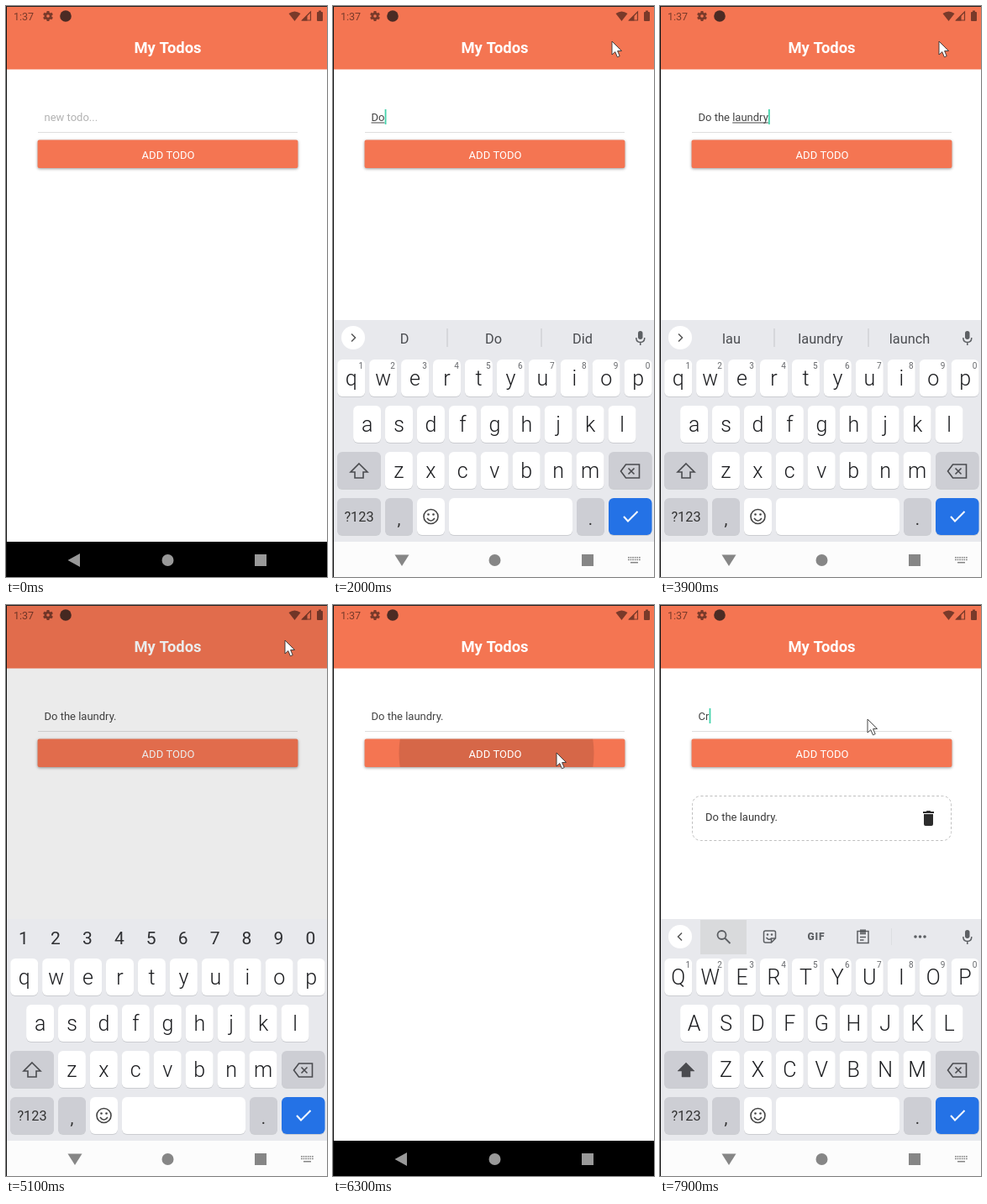
An HTML page with a canvas for the animation above (8000 ms loop, 382 by 680 pixels).

```html
<!DOCTYPE html>
<html lang="en">
<head>
<meta charset="utf-8">
<title>My Todos</title>
<style>
html, body { margin: 0; width: 100%; height: 100%; overflow: hidden; background: #fff; }
canvas { display: block; width: 382px; height: 680px; }
</style>
</head>
<body>
<canvas id="stage"></canvas>
<script>
const W = 382, H = 680, LOOP = 8000, STEP = 100, NAV_Y = 638;
const FONT = 'Roboto, Arial, sans-serif';
const CORAL = '#f47552', STATUS = '#793a2a', ICON = '#5c5f63';
const canvas = document.getElementById('stage');
const dpr = window.devicePixelRatio || 1;
canvas.width = W * dpr;
canvas.height = H * dpr;
const c = canvas.getContext('2d');

// [time, value] lists: the latest entry at or before t applies
const TYPED = [
  [0, ''], [1700, 'D'], [2000, 'Do'], [2200, 'Do '], [2300, 'Do t'], [2400, 'Do th'],
  [2500, 'Do the'], [2600, 'Do the '], [2800, 'Do the l'], [2900, 'Do the la'],
  [3100, 'Do the lau'], [3700, 'Do the laun'], [3800, 'Do the laundr'],
  [3900, 'Do the laundry'], [4200, 'Do the laundry.'], [6700, ''], [7800, 'C'], [7900, 'Cr']
];
const HINTS = [
  [0, null], [1700, 'D|Do|Did'], [2100, 'Do|Don\u2019t|Does'], [2300, 't|the|to'],
  [2500, 'the|them|then'], [2800, 'l|look|last'], [3100, 'lau|laundry|launch'],
  [4000, 'laundry|laundry\u2019s|launder'], [7000, null]
];
const POINTER = [
  [200, 4, 163], [600, 180, 132], [800, 210, 130], [1000, 330, 50], [1100, 332, 42],
  [5800, 332, 42], [6200, 266, 176], [7000, 266, 176], [7400, 247, 136]
];

const clamp = v => Math.max(0, Math.min(1, v));
const latest = (list, t) => list.filter(e => e[0] <= t).pop()[1];

function pointerAt(t) {
  if (t < POINTER[0][0]) return null;
  const i = POINTER.findIndex(p => p[0] > t);
  if (i < 0) return POINTER[POINTER.length - 1].slice(1);
  const a = POINTER[i - 1], b = POINTER[i], k = (t - a[0]) / (b[0] - a[0]);
  return [a[1] + (b[1] - a[1]) * k, a[2] + (b[2] - a[2]) * k];
}

function keyboardAt(t) {
  const rise = p => ({ off: 265 * Math.pow(1 - clamp(p), 1.6), alpha: clamp(p * 1.6) });
  if (t < 1100 || (t >= 5500 && t < 7600)) return { off: 265, alpha: 0 };
  if (t >= 7600) return rise((t - 7520) / 340);
  if (t < 5200) return rise((t - 1050) / 450);
  const p = (t - 5100) / 300;
  return { off: 130 * Math.pow(p, 1.5), alpha: 1 - 0.65 * p };
}

function rect(x, y, w, h, color) {
  c.fillStyle = color;
  c.fillRect(x, y, w, h);
}
function box(x, y, w, h, r, color) {
  c.beginPath();
  c.roundRect(x, y, w, h, r);
  c.fillStyle = color;
  c.fill();
}
function disc(x, y, r, color) {
  c.beginPath();
  c.arc(x, y, r, 0, 7);
  c.fillStyle = color;
  c.fill();
}
function path(d, x, y, fill, stroke, width = 1.5) {
  const p = new Path2D(d);
  c.save();
  c.translate(x, y);
  if (fill) { c.fillStyle = fill; c.fill(p); }
  if (stroke) { c.strokeStyle = stroke; c.lineWidth = width; c.stroke(p); }
  c.restore();
}
function text(s, x, y, size, color, align = 'left', weight = 400) {
  c.font = `${weight} ${size}px ${FONT}`;
  c.textAlign = align;
  c.fillStyle = color;
  c.fillText(s, x, y);
}

function drawHeader() {
  rect(0, 0, W, 75.5, CORAL);
  text('1:37', 9, 17, 12.5, STATUS);
  c.save();
  c.translate(50, 12);
  for (let i = 0; i < 6; i++) {
    rect(-1.5, -6, 3, 4, STATUS);
    c.rotate(Math.PI / 3);
  }
  c.restore();
  disc(50, 12, 4.5, STATUS);
  disc(50, 12, 1.8, CORAL);
  disc(71, 12, 6.8, '#4b2b24');
  path('M-7 -3 Q0 -8 7 -3 L0 6 Z', 343.5, 12, STATUS);
  path('M-5 5 L5 5 L5 -5 Z', 357.5, 12, null, STATUS, 1.2);
  path('M-5.5 5.5 L1 5.5 L1 -1 Z', 357.5, 12, STATUS);
  box(370, 7, 7, 11, 1, STATUS);
  rect(372, 5.5, 3, 2, STATUS);
  text('My Todos', 192.5, 56, 18.4, '#fff', 'center', 700);
}

function drawInput(t) {
  const s = latest(TYPED, t);
  const x = 45.5;
  text(s || 'new todo...', x, 137, 13, s ? '#444' : '#b2b2b2');
  rect(38, 150, 309, 1, '#dedede');
  const end = x + (s ? c.measureText(s).width : 0);
  const word = s.split(' ').pop();
  if (word && t < 4200) rect(end - c.measureText(word).width, 138.5, c.measureText(word).width, 1, '#444');
  const focused = (t >= 1100 && t < 4600) || t >= 7600;
  const blink = t >= 3500 && t < 3700;
  if (focused && !blink) rect(end + 0.2, 123, 1.8, 18, '#45d3ac');
}

function buttonShape() {
  c.beginPath();
  c.roundRect(37.6, 159.6, 309.8, 33.4, 2);
}
function drawButton(t) {
  c.save();
  c.shadowColor = 'rgba(0,0,0,.4)';
  c.shadowBlur = 3.5 * dpr;
  c.shadowOffsetY = dpr;
  buttonShape();
  c.fillStyle = CORAL;
  c.fill();
  c.restore();
  if (t >= 6200 && t < 6600) {
    c.save();
    buttonShape();
    c.clip();
    const k = (t - 6200) / 100;
    disc(194.5, 176.5, 50 + 66 * k, `rgba(0,0,0,${k < 3 ? 0.12 : 0.06})`);
    c.restore();
  }
  text('ADD TODO', 193, 182, 13, '#fff', 'center');
}

function drawItem() {
  c.beginPath();
  c.roundRect(38.5, 227.5, 308, 53, 10);
  c.setLineDash([3, 2.5]);
  c.lineWidth = 1;
  c.strokeStyle = '#bfbfbf';
  c.stroke();
  c.setLineDash([]);
  text('Do the laundry.', 54, 257, 13, '#3a3a3a');
  path('M-6.5 -8 H-3 L-2 -9 H2 L3 -8 H6.5 V-6 H-6.5 Z M-5.5 -5 H5.5 V7 Q5.5 9 3.5 9 H-3.5 Q-5.5 9 -5.5 7 Z', 319.5, 254, '#2c2c2c');
}

function drawKey(x, y, w, color) {
  box(x, y + 1, w, 44, 6, '#cbcdd1');
  box(x, y, w, 44, 6, color);
}

function drawMic() {
  box(363, 387, 5.5, 10, 3, ICON);
  path('M-5 0 Q-5 5.5 0 5.5 Q5 5.5 5 0 M0 5.5 V9', 365.8, 395, null, ICON);
}

function drawStrip(hints, t) {
  if (t >= 7800) rect(48, 375, 55, 41, '#d9dadc');
  disc(24, 395, 14, '#fff');
  path(hints ? 'M-2 -4.5 L2.5 0 L-2 4.5' : 'M2 -4.5 L-2.5 0 L2 4.5', 24, 395, null, '#555', 1.5);
  drawMic();
  if (hints) {
    hints.split('|').forEach((s, i) => text(s, 85 + 106 * i, 401.5, 16.3, '#4a4c50', 'center'));
    rect(135.5, 384, 1, 22, '#c3c5c9');
    rect(247.5, 384, 1, 22, '#c3c5c9');
    return;
  }
  path('M3 -2 A5 5 0 1 1 -7 -2 A5 5 0 1 1 3 -2 M2 2 L8 8', 75.5, 395, null, ICON, 1.8);
  path('M-5 -7 H5 Q7 -7 7 -5 V2 L2 7 H-5 Q-7 7 -7 5 V-5 Q-7 -7 -5 -7 M7 2 H2 V7 M-4 1 Q-1 5 2 2', 130.5, 395, null, ICON);
  disc(128, 392.5, 1.2, ICON);
  disc(133, 392.5, 1.2, ICON);
  c.letterSpacing = '0.9px';
  text('GIF', 186, 399, 12, ICON, 'center', 900);
  c.letterSpacing = '0px';
  path('M-6.5 -6 H6.5 V8 H-6.5 Z M-3.5 -3 H3.5 M-3.5 1 H3.5 M-3.5 4.5 H1', 241.5, 394.5, null, ICON);
  rect(238, 386.5, 7, 4, ICON);
  rect(275, 385, 1, 20, '#dcdee1');
  for (let i = -1; i <= 1; i++) disc(309.5 + 5.5 * i, 395, 1.8, ICON);
}

function drawLetters(row, x, y, upper, digits) {
  [...row].forEach((ch, i) => {
    const cx = x + 37.93 * i;
    drawKey(cx - 16.5, y, 33, '#fff');
    text(upper ? ch.toUpperCase() : ch, cx, y + 31, 25, '#1c1d20', 'center', 300);
    if (digits) text((i + 1) % 10, cx + 11.5, y + 11, 10, '#66686c', 'center');
  });
}

function drawKeyboard(t, kb) {
  const numbers = t >= 4900 && t < 5500;
  const upper = t < 1700 || t >= 7600;
  const grey = '#cdced4';
  c.save();
  c.globalAlpha = kb.alpha;
  c.translate(0, kb.off);
  rect(0, 374, W, H - 374, '#e8e9ed');
  rect(0, NAV_Y, W, H - NAV_Y, '#fcfcfc');
  if (numbers) {
    for (let i = 0; i < 10; i++) text((i + 1) % 10, 21 + 37.93 * i, 404, 21, '#303134', 'center');
  } else {
    drawStrip(latest(HINTS, t), t);
  }
  drawLetters('qwertyuiop', 21.7, 421, upper, !numbers);
  drawLetters('asdfghjkl', 40.6, 476, upper);
  drawLetters('zxcvbnm', 78.4, 531, upper);

  drawKey(5, 531, 52, grey);
  path('M0 -9 L10 1 H5 V8 H-5 V1 H-10 Z', 31, 554, upper ? '#4a4b4f' : null, '#4a4b4f', upper ? 0.5 : 1.6);
  drawKey(328, 531, 51.5, grey);
  path('M-11 0 L-5 -8 H11 V8 H-5 Z M-2 -3.5 L5 3.5 M5 -3.5 L-2 3.5', 353.5, 554, null, '#4a4b4f', 1.6);

  drawKey(5, 586, 52, grey);
  text('?123', 31, 614, 16.3, '#333', 'center');
  drawKey(62, 586, 33, grey);
  text(',', 78.5, 618, 20, '#333', 'center');
  drawKey(100, 586, 33, '#fff');
  c.beginPath();
  c.arc(116.5, 608, 8.5, 0, 7);
  c.lineWidth = 1.6;
  c.strokeStyle = '#444';
  c.stroke();
  disc(113.5, 605.5, 1.3, '#444');
  disc(119.5, 605.5, 1.3, '#444');
  path('M-4.5 2 Q0 8 4.5 2', 116.5, 608, null, '#444', 1.5);
  drawKey(138, 586, 147, '#fff');
  drawKey(290, 586, 33, grey);
  text('.', 306.5, 618, 20, '#333', 'center');
  drawKey(328, 586, 51.5, '#2472e6');
  path('M-8 0 L-3 5.5 L8.5 -6', 354, 608, null, '#fff', 2);
  c.restore();
}

function drawNav(kb) {
  const open = kb.off < 1;
  const shade = open ? '#868686' : kb.alpha > 0.6 ? '#e0e0e0' : '#999';
  if (!open) rect(0, NAV_Y, W, H - NAV_Y, `rgba(0,0,0,${clamp((kb.off / 160) ** 2)})`);
  if (open) path('M-8.5 -6.5 H8.5 L0 7 Z', 82, 660, shade);
  else path('M7.5 -8 V8 L-7 0 Z', 80.5, 660, shade);
  disc(192.5, 660, 7, shade);
  rect(296, 653, 14, 14, shade);
  if (kb.alpha > 0.7) {
    for (let i = 0; i < 6; i++) {
      rect(351 + 2.6 * i, 656, 1.7, 1.5, shade);
      rect(351 + 2.6 * i, 658.7, 1.7, 1.5, shade);
    }
    rect(354, 662, 9, 1.5, shade);
  }
}

function drawPointer(p) {
  if (p) path('M0 0 V16 L3.8 12.6 L6.4 18.8 L9.2 17.6 L6.6 11.6 L11.5 11.4 Z', p[0], p[1], '#fff', '#333', 0.9);
}

function draw(t) {
  c.setTransform(dpr, 0, 0, dpr, 0, 0);
  rect(0, 0, W, H, '#fff');
  drawHeader();
  drawInput(t);
  drawButton(t);
  if (t >= 6700) drawItem();
  if (t >= 4600 && t < 5800) rect(0, 0, W, H, `rgba(0,0,0,${0.08 * clamp((t - 4500) / 300)})`);
  rect(0, NAV_Y, W, H - NAV_Y, '#000');
  const kb = keyboardAt(t);
  if (kb.alpha > 0) drawKeyboard(t, kb);
  drawNav(kb);
  rect(0, 0, 1, H, '#111');
  rect(0, 0, W, 1, '#222');
  drawPointer(pointerAt(t));
}

const start = performance.now();
function tick() {
  const t = (performance.now() - start) % LOOP;
  draw(Math.floor(t / STEP) * STEP);
  requestAnimationFrame(tick);
}
tick();
</script>
</body>
</html>
```
